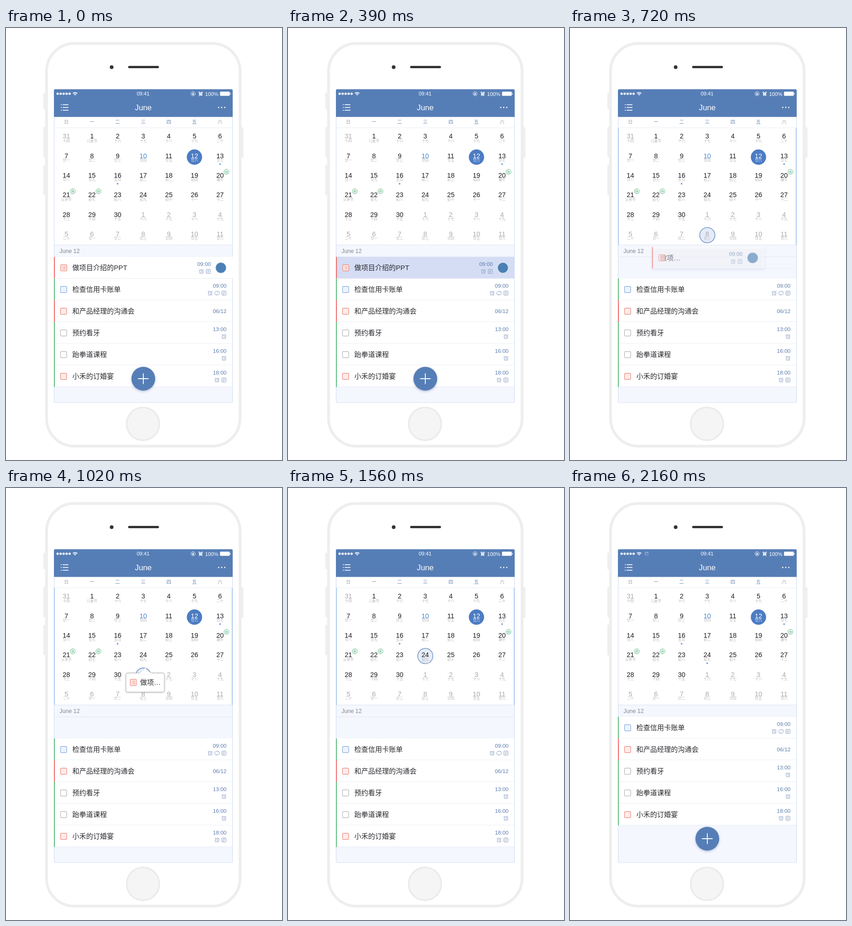
Recreate the animation shown at these times as an HTML page with a canvas. Size 599x935 px, loop 2.19 s.

```html
<!DOCTYPE html>
<html lang="zh">
<head>
<meta charset="utf-8">
<style>
html, body { margin: 0; width: 100%; height: 100%; overflow: hidden; background: #fff; }
canvas { display: block; width: 599px; height: 935px; }
</style>
</head>
<body>
<canvas id="stage"></canvas>
<script>
const W = 599, H = 935, LOOP = 2190, STEP = 30;
const canvas = document.getElementById('stage');
const dpr = window.devicePixelRatio || 1;
canvas.width = W * dpr;
canvas.height = H * dpr;
const c = canvas.getContext('2d');

const FONT = '"Liberation Sans", "Noto Sans CJK SC", "Noto Sans CJK", Arial, sans-serif';
const BLUE = '#567eb6', INK = '#5b7cad', RED = '#ef6a68', GREEN = '#5cbd7c', PALE = '#f5f7fe', LINE = '#e6eaf2';
const CARD_TEXT = '做项…';

const clamp = v => Math.max(0, Math.min(1, v));
const part = (t, a, b) => clamp((t - a) / (b - a));
const mix = (a, b, p) => a + (b - a) * p;
const easeOut = p => 1 - (1 - p) * (1 - p);
const easeInOut = p => p * p * (3 - 2 * p);

function text(s, x, y, size, color, align = 'left') {
  c.font = size + 'px ' + FONT;
  c.fillStyle = color;
  c.textAlign = align;
  c.fillText(s, x, y + size * 0.36);
}
function rect(x, y, w, h, color) {
  c.fillStyle = color;
  c.fillRect(x, y, w, h);
}
function paint(fill, stroke, width = 1) {
  if (fill) { c.fillStyle = fill; c.fill(); }
  if (stroke) { c.strokeStyle = stroke; c.lineWidth = width; c.stroke(); }
}
function circle(x, y, r, fill, stroke, width) {
  c.beginPath();
  c.arc(x, y, r, 0, 7);
  paint(fill, stroke, width);
}
function round(x, y, w, h, r, fill, stroke, width) {
  c.beginPath();
  c.roundRect(x, y, w, h, r);
  paint(fill, stroke, width);
}
function lines(points, color, width = 1) {
  c.beginPath();
  for (const [x1, y1, x2, y2] of points) { c.moveTo(x1, y1); c.lineTo(x2, y2); }
  paint(null, color, width);
}
function faded(alpha, draw) {
  if (alpha <= 0) return;
  c.save();
  c.globalAlpha *= alpha;
  draw();
  c.restore();
}
function shadow(color, blur, dy) {
  c.shadowColor = color;
  c.shadowBlur = blur * dpr;
  c.shadowOffsetY = dy * dpr;
}

function alarm(x, y, color) {
  circle(x, y + 0.3, 4, null, color, 1);
  lines([[x, y - 2, x, y + 0.8], [x, y + 0.8, x + 2, y + 0.8], [x - 5, y - 3, x - 3, y - 5],
    [x + 5, y - 3, x + 3, y - 5], [x - 3, y + 4, x - 4, y + 5.2], [x + 3, y + 4, x + 4, y + 5.2]], color, 0.9);
}
function note(x, y, color) {
  round(x - 4.5, y - 4.5, 9, 9, 1, null, color, 0.9);
  lines([[x - 2.5, y - 2, x + 2.5, y - 2], [x - 2.5, y + 0.2, x + 2.5, y + 0.2], [x - 2.5, y + 2.4, x + 1, y + 2.4]], color, 0.8);
}
function repeat(x, y, color) {
  c.beginPath();
  c.arc(x - 1, y, 4, 1.9, 4.9);
  c.lineTo(x + 2, y - 4);
  c.moveTo(x + 2, y - 4);
  c.arc(x + 1, y, 4, -1.2, 1.75);
  c.lineTo(x - 2, y + 4);
  paint(null, color, 0.9);
  lines([[x + 1, y - 2, x + 3, y - 4], [x - 1, y + 2, x - 3, y + 4]], color, 0.9);
}
const icons = { alarm, repeat, note };

function checkbox(x, y, color, fill, list) {
  round(x - 6.7, y - 6.7, 13.4, 13.4, 1.8, fill, color, 1.2);
  if (!list) return;
  for (const d of [-2.8, 0, 2.8])
    lines([[x - 4, y + d, x - 2.8, y + d], [x - 1.7, y + d, x + 4, y + d]], color, 0.9);
}
const redBox = (x, y, list) => checkbox(x, y, '#ee8379', '#fdecea', list);

function phone() {
  rect(0, 0, W, H, '#fff');
  for (const [x, y, h] of [[81, 140, 36], [81, 214, 66], [81, 296, 66], [509, 215, 66]])
    round(x, y, 6.5, h, 2, '#efefef');
  round(88, 33.5, 420, 871.5, 60, '#fff', '#eee', 6);
  circle(229.3, 84.7, 4, '#333');
  round(265, 82, 67, 5, 2.5, '#333');
  circle(297.3, 856.8, 35.5, '#f5f5f5', '#ebebeb', 3.5);
}

function statusBar(t) {
  for (let i = 0; i < 5; i++) circle(112 + i * 6.5, 142.3, 2.5, '#fff');
  c.lineCap = 'butt';
  for (const r of [2, 4.5, 7]) {
    c.beginPath();
    c.arc(150, 146.5, r, -2.35, -0.79);
    paint(null, '#fff', 1.5);
  }
  faded(part(t, 1710, 1830), () => {
    const turn = Math.floor(t / 90) % 8;
    for (let i = 0; i < 8; i++) {
      const a = i * Math.PI / 4, x = Math.cos(a), y = Math.sin(a);
      const light = 0.3 + 0.65 * ((i - turn + 8) % 8) / 7;
      lines([[166.5 + x * 2.2, 142.2 + y * 2.2, 166.5 + x * 4.5, 142.2 + y * 4.5]], `rgba(255,255,255,${light})`, 1.1);
    }
  });
  text('09:41', 297.5, 142.5, 11, '#fff', 'center');
  circle(406, 142.3, 4.4, null, '#fff', 0.9);
  rect(404.2, 141.8, 3.6, 2.8, '#fff');
  c.beginPath();
  c.arc(406, 141.6, 1.3, Math.PI, 0);
  paint(null, '#fff', 0.8);
  circle(422.5, 142.7, 3.4, '#fff');
  lines([[418, 140.2, 420.4, 137.8], [427, 140.2, 424.6, 137.8], [420, 145.6, 419, 147], [425, 145.6, 426, 147]], '#fff', 1.3);
  lines([[422.5, 140.7, 422.5, 143], [422.5, 143, 424.2, 143]], BLUE, 0.9);
  text('100%', 432, 142.5, 11.3, '#fff');
  round(464.5, 137.8, 21, 9, 1.5, '#fff');
  rect(486.2, 140.8, 1.4, 3, '#fff');
}

function header(t) {
  rect(104, 132, 388, 60.5, BLUE);
  statusBar(t);
  for (const y of [166, 172, 178]) {
    rect(119, y - 0.8, 2, 1.6, '#fff');
    rect(123, y - 0.8, 12.5, 1.6, '#fff');
  }
  text('June', 298, 172, 16.8, '#fff', 'center');
  for (const x of [461.7, 468.2, 474.8]) circle(x, 172, 1.4, '#fff');
}

const lunar = [
  '十四 儿童节 十六 十七 十八 十九 二十',
  '廿一 廿二 廿三 廿四 廿五 廿六 廿七',
  '廿八 廿九 五月 初二 初三 初四 端午',
  '父亲节 初七 初八 初九 初十 十一 十二',
  '十三 十四 十五 十六 十七 十八 十九',
  '二十 廿一 廿二 廿三 廿四 廿五 廿六'
].map(s => s.split(' '));
const colX = i => 131 + i * 55.6;
const rowY = i => 234 + i * 42.35;

function calendar(t) {
  [...'日一二三四五六'].forEach((d, i) =>
    text(d, colX(i), 203.5, 10.3, i % 6 ? '#6d88b4' : '#a6a6a6', 'center'));
  rect(104, 215.5, 388, 1, '#e9edf6');

  // Drop target follows the dragged card up the Wednesday column
  const ring = t < 930 ? 5 : t < 1110 ? 4 : 3;
  const ringAlpha = part(t, 600, 690) * (1 - part(t, 1590, 1680));
  faded(ringAlpha, () => circle(298, rowY(ring) + 2.6, 16.5, '#e5ecf8', '#6186bd', 1.3));
  circle(409, 279.4, 16.6, '#4c7cc3');

  for (let r = 0; r < 6; r++) for (let i = 0; i < 7; i++) {
    const n = r * 7 + i, day = n === 0 ? 31 : n > 30 ? n - 30 : n;
    const x = colX(i), y = rowY(r), sel = n === 12;
    const color = sel ? '#fff' : n === 10 ? '#4485d6' : n === 0 || n > 30 ? '#a9a9a9' : '#1c1c22';
    text(String(day), x, y, 14.5, color, 'center');
    text(lunar[r][i], x, y + 10, 7.6, sel ? '#e6eefb' : '#b4b4b4', 'center');
  }
  for (const [x, y] of [[478.5, 311.2], [145, 353.4], [200.7, 353.4]]) {
    circle(x, y, 5.4, '#fff', '#4fae7a', 0.9);
    text('休', x, y, 7, '#4fae7a', 'center');
  }
  circle(464.6, 294.6, 1.9, '#79a5e0');
  circle(242.2, 337, 1.9, '#79a5e0');
  faded(part(t, 1620, 1710), () => circle(297.8, 379.3, 1.9, '#79a5e0'));

  rect(104, 469.5, 388, 26, PALE);
  rect(104, 469, 388, 1, '#dfe6f4');
  rect(104, 494.7, 388, 1, '#dfe6f4');
  text('June 12', 116, 483, 12.4, '#85888f');
}

const tasks = [
  { name: '检查信用卡账单', time: '09:00', bar: GREEN, box: ['#7fa6de', '#eef4fd'], marks: ['alarm', 'repeat', 'note'] },
  { name: '和产品经理的沟通会', time: '06/12', bar: RED, box: ['#ee8379', '#fdecea'], marks: [] },
  { name: '预约看牙', time: '13:00', bar: GREEN, box: ['#b3b3b3', '#fff'], marks: ['alarm'] },
  { name: '跆拳道课程', time: '16:00', bar: GREEN, box: ['#b3b3b3', '#fff'], marks: ['alarm'] },
  { name: '小禾的订婚宴', time: '18:00', bar: GREEN, box: ['#ee8379', '#fdecea'], marks: ['alarm', 'note'] }
];

function details(time, marks, right, y) {
  text(time, right, marks.length ? y - 8.5 : y, 11.8, INK, 'right');
  marks.forEach((m, i) => icons[m](right - 5.5 - (marks.length - 1 - i) * 15, y + 7.8, '#8197bd'));
}

function taskList(t) {
  const top = mix(542, 495, easeInOut(part(t, 1620, 1800)));
  tasks.forEach((k, i) => {
    const y = top + i * 47, mid = y + 24;
    rect(104, y, 388, 47, '#fff');
    rect(104, y + 46.3, 388, 1, LINE);
    rect(104, y, 2, 47, k.bar);
    checkbox(125, mid, ...k.box);
    text(k.name, 144, mid, 15, '#2b2b30');
    details(k.time, k.marks, 478.5, mid);
  });
}

function cardY(t) {
  if (t < 720) return mix(519, 497.5, easeInOut(part(t, 450, 720)));
  if (t < 1020) return mix(497.5, 420.7, part(t, 720, 1020));
  return mix(420.7, 406, easeOut(part(t, 1020, 1260)));
}

function topRow(t) {
  const p = easeInOut(part(t, 450, 720)), q = easeInOut(part(t, 720, 840));
  const left = mix(mix(104, 178, p), 260, q), right = mix(mix(492, 422, p), 344, q);
  const y = cardY(t), w = right - left, top = y - 23.8;
  faded(mix(1, 0.62, p) * (1 - q), () => {
    c.save();
    if (p > 0) shadow('rgba(90,110,160,.25)', 5, 2);
    rect(left, top, w, 47, '#fff');
    c.restore();
    faded(part(t, 150, 300) * (1 - p), () => rect(left, top, w, 47, '#d4ddf4'));
    rect(left, top + 46.3, w, 1, LINE);
    if (p > 0) rect(right, top + 46.3, 492 - right, 1, LINE);
    c.beginPath();
    c.rect(left, top, w, 47);
    c.clip();
    rect(left, top, 2, 47, RED);
    text(w < 300 ? CARD_TEXT : '做项目介绍的PPT', left + mix(40, 17, p), y, 15, '#2b2b30');
    redBox(left + 21.3, y, true);
    details('09:00', ['alarm', 'note'], right - 47.5, y);
    circle(right - 25.6, y, 11.6, '#4b80b4', '#e3e6ec', 1.2);
  });
}

function popup(t) {
  const shrink = part(t, 1440, 1575);
  const alpha = part(t, 750, 870) * (1 - 0.6 * shrink);
  if (shrink >= 1) return;
  const tip = cardY(t) - 31.5;
  faded(alpha, () => {
    const s = mix(0.7, 1, easeOut(part(t, 750, 870))) * (1 - shrink);
    c.translate(302, tip);
    c.scale(s, s);
    c.save();
    shadow('rgba(0,0,0,.16)', 3, 1);
    c.beginPath();
    c.roundRect(-42, 11, 84, 41.5, 4);
    paint('#fff', '#c3c3c3', 1.2);
    c.restore();
    c.beginPath();
    c.moveTo(-13, 11.7);
    c.quadraticCurveTo(-6, 7, 0, 0);
    c.quadraticCurveTo(6, 7, 13, 11.7);
    paint('#fff', '#cbcbcb', 0.8);
    rect(-13, 11, 26, 2, '#fff');
    redBox(-25.7, 31.7, true);
    text(CARD_TEXT, -11, 31.7, 15, '#2b2b30');
  });
}

function addButton(t) {
  const y = t < 1200
    ? mix(759, 840, Math.pow(part(t, 500, 650), 2))
    : mix(840, 759, easeOut(part(t, 1860, 2010)));
  if (y >= 839) return;
  const alpha = 1 - 0.22 * clamp((y - 759) / 29);
  faded(alpha, () => {
    c.save();
    shadow('rgba(60,90,150,.35)', 5, 2);
    circle(298, y, 25.8, BLUE);
    c.restore();
    lines([[286.5, y, 309.5, y], [298, y - 11.5, 298, y + 11.5]], '#fff', 1.8);
  });
}

function screen(t) {
  c.save();
  c.beginPath();
  c.roundRect(104, 132.5, 388, 679, 3);
  c.clip();
  rect(104, 132, 388, 680, '#fff');
  rect(104, 495, 388, 317, PALE);
  header(t);
  calendar(t);
  taskList(t);
  c.restore();

  c.save();
  c.beginPath();
  c.rect(104, 192.5, 388, 619);
  c.clip();
  round(104.5, 180, 387, 631, 3, null, '#ccd9f1', 1);
  const glow = part(t, 570, 690) * (1 - part(t, 1590, 1710));
  faded(glow, () => {
    rect(104, 216, 2, 253.5, '#abc9f0');
    rect(490, 216, 2, 253.5, '#abc9f0');
  });
  // Colour bars stay above the screen edge
  const top = mix(542, 495, easeInOut(part(t, 1620, 1800)));
  tasks.forEach((k, i) => rect(104, top + i * 47, 2, 47, k.bar));
  topRow(t);
  popup(t);
  addButton(t);
  c.restore();
}

function draw(now) {
  const t = Math.floor((now % LOOP) / STEP) * STEP;
  c.setTransform(dpr, 0, 0, dpr, 0, 0);
  phone();
  screen(t);
}

let start = null;
function tick(now) {
  if (start === null) start = now;
  draw(now - start);
  requestAnimationFrame(tick);
}
draw(0);
requestAnimationFrame(tick);
</script>
</body>
</html>
```
